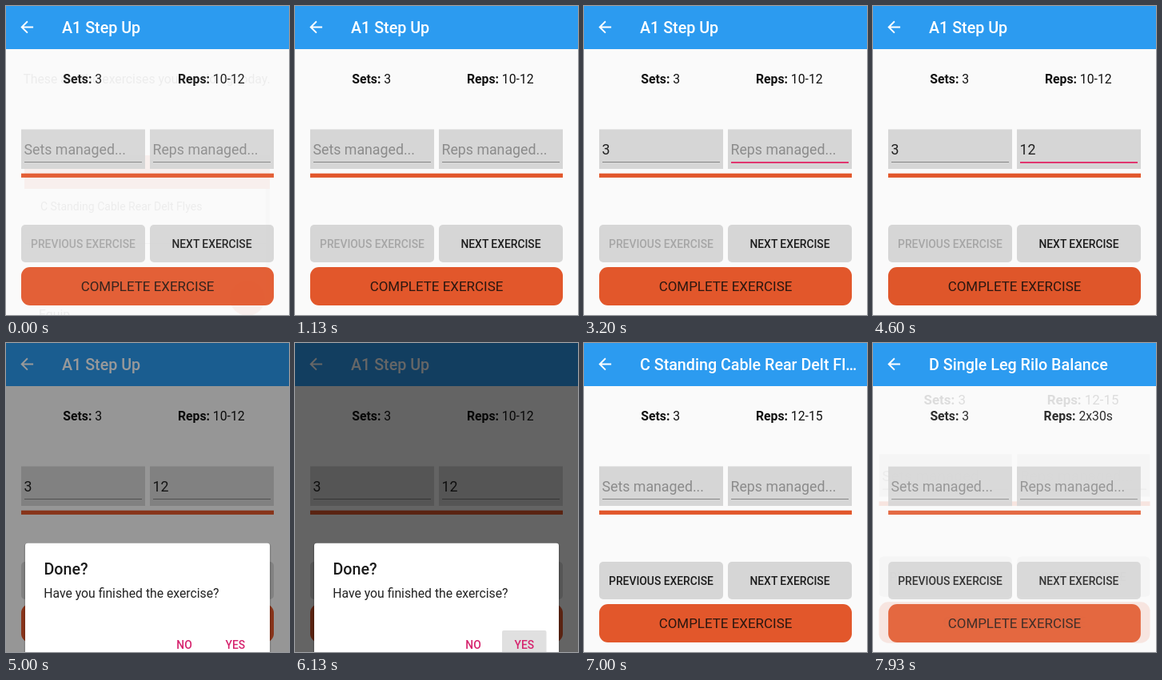
Animation of 354x387 px, one loop 8000 ms. Source, as an HTML page:

```html
<!DOCTYPE html>
<html lang="en">
<head>
<meta charset="utf-8">
<title>Workout exercise</title>
<style>
  html, body { margin: 0; width: 100%; height: 100%; overflow: hidden; background: #fafafa; }
  svg { display: block; width: 100vw; height: 100vh; font-family: Roboto, "Liberation Sans", sans-serif; }
  text { white-space: pre; }
  .title { font-size: 19.7px; font-weight: 500; }
  .info { font-size: 15.75px; fill: #111; text-anchor: middle; }
  .info tspan { font-weight: 700; }
  .field { font-size: 17.75px; }
  .btn { font-size: 13.85px; font-weight: 500; fill: #1c1c1c; }
  .mid { text-anchor: middle; }
  .done { font-size: 16.95px; fill: #2b1710; }
  .body { font-size: 15.75px; fill: #222; }
  .pink { fill: #d6246e; }
</style>
</head>
<body>
<svg id="stage" viewBox="0 0 354 387" preserveAspectRatio="none"></svg>
<script>
const LOOP = 8000, TICK = 1000 / 15;
const ORANGE = '#e2572b', GREY = '#d6d6d6', PINK = '#e0366f';
const stage = document.getElementById('stage');

function add(parent, tag, attrs = {}, text) {
  const el = document.createElementNS('http://www.w3.org/2000/svg', tag);
  for (const k in attrs) el.setAttribute(k, attrs[k]);
  if (text !== undefined) el.textContent = text;
  parent.appendChild(el);
  return el;
}
const rect = (p, x, y, width, height, fill, rx = 0) => add(p, 'rect', { x, y, width, height, fill, rx });
const label = (p, x, y, cls, text, extra = {}) => add(p, 'text', { x, y, class: cls, ...extra }, text);
const set = (el, k, v) => el.setAttribute(k, v);

function info(p, x, name, value) {
  const t = label(p, x, 96.5, 'info');
  add(t, 'tspan', {}, name + ':');
  t.append(' ' + value);
}

function field(p, x, hint) {
  rect(p, x, 154.5, 155, 49.5, GREY);
  const text = label(p, x + 3.5, 186, 'field', hint, { fill: '#8b8b8b' });
  const line = rect(p, x + 4, 195, 147, 1, '#858585');
  const caret = rect(p, x + 4, 169, 2, 21, PINK);
  return (value, focus, blink) => {
    text.textContent = value || hint;
    set(text, 'fill', value ? '#222' : '#8b8b8b');
    set(line, 'fill', focus ? PINK : '#858585');
    set(line, 'height', focus ? 2 : 1);
    set(caret, 'x', x + 4 + value.length * 9.95);
    set(caret, 'opacity', focus && blink ? 1 : 0);
  };
}

function page(reps, first) {
  const g = add(stage, 'g');
  info(g, 95.7, 'Sets', '3');
  info(g, 256.8, 'Reps', reps);
  const sets = field(g, 19, 'Sets managed...');
  const done = field(g, 180, 'Reps managed...');
  sets('', false); done('', false);
  rect(g, 19, 209.7, 316, 5.2, ORANGE);
  rect(g, 19, 274, 155, 47, GREY, 5);
  label(g, 96.5, 303, 'btn mid', 'PREVIOUS EXERCISE', first ? { style: 'fill:#a6a6a6' } : {});
  rect(g, 180, 274, 155, 47, GREY, 5);
  const next = rect(g, 180, 274, 155, 47, '#000', 5);
  label(g, 257.5, 303, 'btn mid', 'NEXT EXERCISE');
  rect(g, 19, 327, 316, 48, ORANGE, 11);
  const finish = rect(g, 19, 327, 316, 48, '#000', 11);
  label(g, 177, 357, 'done mid', 'COMPLETE EXERCISE');
  set(next, 'opacity', 0);
  set(finish, 'opacity', 0);
  return { g, sets, done, next, finish };
}

rect(stage, 0, 0, 354, 387, '#fafafa');

// Fading exercise list left over from the previous screen
const list = add(stage, 'g');
const pages = [page('10-12', true), page('12-15'), page('2x30s')];
label(list, 176, 97, 'body mid', 'These are the exercises you are doing today.');
rect(list, 23, 187, 307, 42, ORANGE);
rect(list, 325, 229, 5, 145, '#ccc');
label(list, 43, 256, 'body', 'C Standing Cable Rear Delt Flyes', { style: 'font-size:14px' });
rect(list, 24, 297, 301, 1, '#999');
add(list, 'circle', { cx: 302, cy: 366, r: 22, fill: ORANGE });
label(list, 41, 392, 'body', 'Equip.');

rect(stage, 0, 0, 354, 54, '#2c9bf0');
add(stage, 'path', {
  d: 'M20 11H7.83l5.59-5.59L12 4l-8 8 8 8 1.41-1.41L7.83 13H20z',
  fill: '#fff', transform: 'translate(14.4 14.6) scale(.985)'
});
const title = label(stage, 70, 34, 'title', '', { fill: '#fff' });
const names = ['A1 Step Up', 'C Standing Cable Rear Delt Fl…', 'D Single Leg Rilo Balance'];

const dim = rect(stage, 0, 0, 354, 387, '#000');
const dialog = add(stage, 'g');
rect(dialog, 22.5, 251, 309, 150, 'rgba(0,0,0,.12)', 4);
rect(dialog, 24, 250.7, 306, 150, '#fff', 3);
label(dialog, 47.5, 290, 'title', 'Done?', { fill: '#1c1c1c' });
label(dialog, 47.3, 319, 'body', 'Have you finished the exercise?');
const yes = rect(dialog, 259, 360, 55.5, 36, '#e0e0e0', 2);
label(dialog, 213.3, 383, 'btn pink', 'NO', { style: 'fill:#d6246e' });
label(dialog, 274.5, 383, 'btn pink', 'YES', { style: 'fill:#d6246e' });

const within = (t, a, b) => t >= a && t < b;

// Linear interpolation through [time, value] stops
function track(t, stops) {
  if (t <= stops[0][0]) return stops[0][1];
  for (let i = 1; i < stops.length; i++) {
    const [t0, v0] = stops[i - 1], [t1, v1] = stops[i];
    if (t <= t1) return v0 + (v1 - v0) * (t - t0) / (t1 - t0);
  }
  return stops[stops.length - 1][1];
}

function pose(p, alpha, scale) {
  set(p.g, 'opacity', alpha);
  set(p.g, 'display', alpha > 0 ? 'inline' : 'none');
  set(p.g, 'transform', `translate(177 365) scale(${scale}) translate(-177 -365)`);
}

const swaps = [6560, 7823], SWAP = 220;

function render(ms) {
  const t = Math.floor((ms + 5) / TICK) * TICK + 0.5;

  const ghost = track(t, [[70, 0.06], [200, 0]]);
  set(list, 'opacity', ghost);

  let current = 0;
  pages.forEach(p => pose(p, 0, 1));
  pose(pages[0], 1 - ghost, 1);
  swaps.forEach((start, i) => {
    if (t < start) return;
    current = i + 1;
    const left = 1 - Math.min(1, (t - start) / SWAP);
    const fade = left ** 3, grow = 1 - left ** 5;
    if (i) pose(pages[i - 1], 0, 1);
    pose(pages[i], fade, 1 + 0.075 * grow);
    pose(pages[i + 1], 1 - fade, 0.975 + 0.025 * grow);
  });
  title.textContent = names[current];

  const first = pages[0];
  const setsBlink = within(t, 1200, 1666) || within(t, 2066, 2600);
  const repsBlink = within(t, 2666, 3200) || within(t, 3400, 4400);
  first.sets(t >= 2066 ? '3' : '', within(t, 1200, 2666), setsBlink);
  first.done(t >= 3866 ? '12' : t >= 3466 ? '1' : '', within(t, 2666, 4866), repsBlink);
  set(first.finish, 'opacity', track(t, [[4590, 0], [4670, 0.1], [4870, 0.1], [5000, 0]]));
  set(pages[1].next, 'opacity', track(t, [[7725, 0], [7800, 0.1], [7930, 0]]));

  set(dim, 'opacity', track(t, [[4866, 0], [5000, 0.4], [5133, 0.6], [6390, 0.6], [6580, 0]]));
  set(dialog, 'opacity', track(t, [[4866, 0], [4980, 1], [6390, 1], [6540, 0]]));
  set(yes, 'opacity', track(t, [[5925, 0], [6100, 1]]));
}

function frame() {
  render(performance.now() % LOOP);
  requestAnimationFrame(frame);
}
frame();
</script>
</body>
</html>
```
